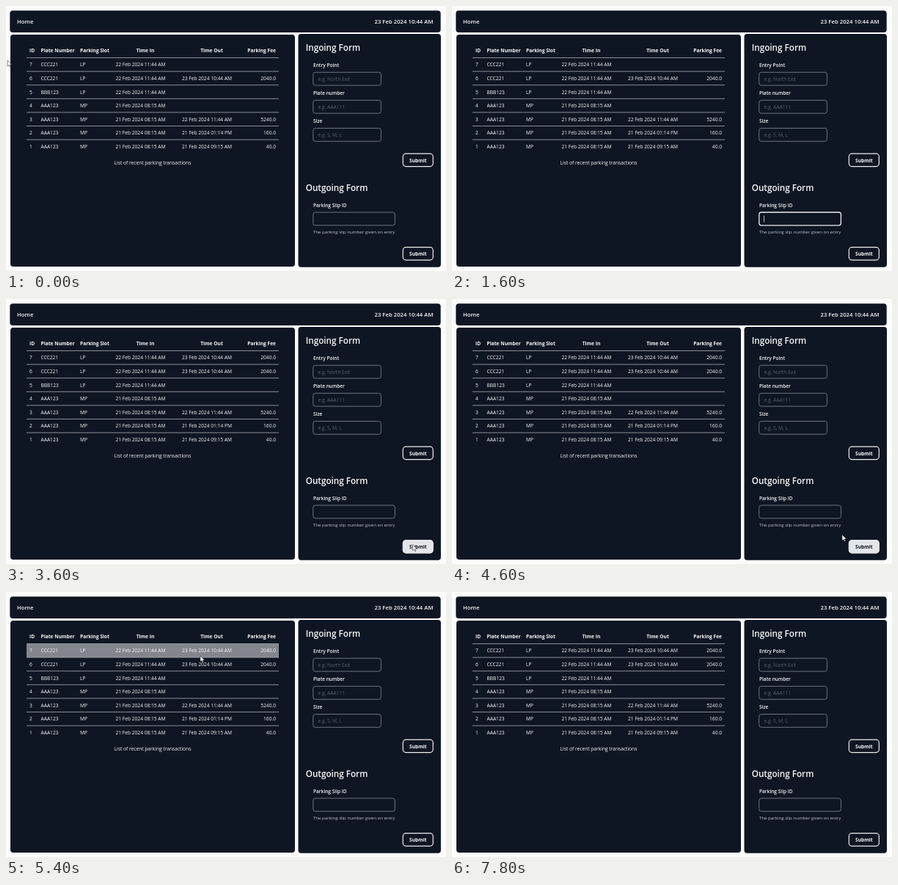
Write an HTML page that moves like this. It is 600 by 361 pixels and loops after 7.9 s.

```html
<!DOCTYPE html>
<html lang="en">
<head>
<meta charset="utf-8">
<title>Parking dashboard</title>
<style>
html, body { margin: 0; width: 100%; height: 100%; overflow: hidden; background: #fcfcfd; }
svg { display: block; width: 600px; height: 361px; }
text { font-family: "Open Sans", "Noto Sans", sans-serif; font-size: 6.65px; fill: #f6f7f9; white-space: pre; }
.panel { fill: #0f1623; }
.bold { font-weight: 700; }
.semi { font-weight: 600; }
.nav { font-weight: 600; font-size: 7.75px; }
.title { font-weight: 600; font-size: 11.7px; }
.label { font-weight: 600; font-size: 6.55px; }
.dim { fill: #59606d; }
.hint { font-size: 6.1px; fill: #c3c7ce; }
.field { fill: none; stroke: #858b96; stroke-width: .8; }
.field.focus { stroke: #eceef1; stroke-width: 1.3; }
.button { fill: none; stroke: #eceef1; stroke-width: 1.2; }
.button.hover { fill: #e3e5e9; stroke: #e3e5e9; }
.button.hover + text { fill: #0f1623; }
.rule { stroke: #a9adb4; stroke-width: .8; }
.row { fill: #83868e; }
</style>
</head>
<body>
<svg id="stage" viewBox="0 0 600 361"></svg>
<script>
const LOOP = 7900, STEP = 100, PAID = 3600;
const ROW_TOP = 70.5, ROW_H = 18.6;
const stage = document.getElementById('stage');
const parts = [];

const text = (x, y, s, cls = '', anchor = 'start', id = '') =>
  parts.push(`<text x="${x}" y="${y}" class="${cls}" text-anchor="${anchor}" id="${id}">${s}</text>`);
const rect = (x, y, w, h, cls, r = 0, id = '') =>
  parts.push(`<rect x="${x}" y="${y}" width="${w}" height="${h}" rx="${r}" class="${cls}" id="${id}"/>`);

const columns = [[32, 'start'], [47.5, 'start'], [101, 'start'], [183.5, 'middle'], [274, 'middle'], [368, 'end']];
const rows = [
  ['7', 'CCC221', 'LP', '22 Feb 2024 11:44 AM', '23 Feb 2024 10:44 AM', '2040.0'],
  ['6', 'CCC221', 'LP', '22 Feb 2024 11:44 AM', '23 Feb 2024 10:44 AM', '2040.0'],
  ['5', 'BBB123', 'LP', '22 Feb 2024 11:44 AM', '', ''],
  ['4', 'AAA123', 'MP', '21 Feb 2024 08:15 AM', '', ''],
  ['3', 'AAA123', 'MP', '21 Feb 2024 08:15 AM', '22 Feb 2024 11:44 AM', '5240.0'],
  ['2', 'AAA123', 'MP', '21 Feb 2024 08:15 AM', '21 Feb 2024 01:14 PM', '160.0'],
  ['1', 'AAA123', 'MP', '21 Feb 2024 08:15 AM', '21 Feb 2024 09:15 AM', '40.0']
];

function buildTable() {
  rect(6, 39, 388, 316, 'panel', 4);
  rect(28, ROW_TOP, 344, ROW_H, 'row', 0, 'rowHover');
  ['ID', 'Plate Number', 'Parking Slot', 'Time In', 'Time Out', 'Parking Fee'].forEach((s, i) => {
    const [x, anchor] = columns[i];
    text(anchor === 'middle' ? x + 6.5 : x, 63.3, s, 'bold', anchor);
  });
  rows.forEach((cells, r) => {
    const y = ROW_TOP + r * ROW_H;
    parts.push(`<path d="M28 ${y}H372" class="rule"/>`);
    cells.forEach((s, c) =>
      text(columns[c][0], y + 11.9, s, '', columns[c][1], r === 0 && c > 3 ? 'paid' + c : ''));
  });
  text(200, 215.7, 'List of recent parking transactions', '', 'middle');
}

function submit(y, id) {
  rect(541.3, y, 41, 17.4, 'button', 4, id);
  text(561.8, y + 11.3, 'Submit', 'bold', 'middle');
}

function buildForms() {
  rect(398.5, 38, 194.5, 317.7, 'panel', 4);
  text(408.7, 61.2, 'Ingoing Form', 'title');
  [['Entry Point', 'e.g. North Exit'], ['Plate number', 'e.g. AAA111'], ['Size', 'e.g. S, M, L']].forEach(([label, tip], i) => {
    const y = 90.3 + i * 38.1;
    text(419, y - 7.1, label, 'label');
    rect(418.8, y, 92.6, 17.8, 'field', 3);
    text(425.5, y + 11.2, tip, 'dim');
  });
  submit(201.2, 'submitIn');
  text(408.7, 251.9, 'Outgoing Form', 'title');
  text(419, 274, 'Parking Slip ID', 'label');
  rect(418.8, 281, 111.6, 17.8, 'field', 3, 'slip');
  text(425.7, 292.4, '7', '', 'start', 'typed');
  rect(425.3, 285.5, .7, 9, '', 0, 'caret');
  text(419, 310.4, 'The parking slip number given on entry', 'hint');
  submit(328.7, 'submitOut');
}

rect(5.3, 6.3, 587.4, 29.6, 'panel', 4);
text(15, 23.8, 'Home', 'nav');
text(582.6, 23.8, '23 Feb 2024 10:44 AM', 'nav', 'end');
buildTable();
buildForms();
parts.push('<path id="cursor" d="M0 0V8.2L1.9 6.4 3.2 9.3 4.5 8.7 3.2 5.9H5.8Z" fill="#fff" stroke="#111" stroke-width=".5"/>');
stage.innerHTML = parts.join('');

const $ = id => document.getElementById(id);
const show = (id, on) => $(id).setAttribute('visibility', on ? 'visible' : 'hidden');

// Pointer path: time, x, y
const path = [
  [0, 2, 74], [500, 62, 80], [900, 62, 80], [1000, 94, 104], [1200, 290, 200],
  [1400, 440, 270], [1600, 478, 290], [2800, 478, 290], [2900, 541, 317],
  [3000, 550, 330], [3100, 554.5, 334.5], [3900, 554.5, 334.5], [4100, 557.5, 338.5],
  [4500, 557.5, 338.5], [4600, 532, 321], [4900, 370, 200], [5200, 275, 103],
  [5300, 267, 88.5], [5400, 265, 87], [5700, 270, 80], [5800, 270, 80],
  [6300, 358, 80], [6900, 358, 80], [7000, 352, 80], [7600, 200, 372], [LOOP, 200, 372]
];

function pointer(t) {
  t = (t + LOOP) % LOOP;
  const i = path.findIndex(p => p[0] > t);
  const [t0, x0, y0] = path[i - 1], [t1, x1, y1] = path[i];
  const k = (t - t0) / (t1 - t0);
  return [x0 + (x1 - x0) * k, y0 + (y1 - y0) * k];
}

const inside = (x, y, l, t, r, b) => x >= l && x <= r && y >= t && y <= b;

// The arrow gives way to a text pointer over the slip field and the first row's cells.
const overText = (x, y) => inside(x, y, 419, 281, 530, 299) ||
  [[47, 73], [149, 219], [239, 309], [346, 369]].some(([l, r]) => inside(x, y, l, 75, r, 85));

function draw(now) {
  const t = Math.floor(now % LOOP / STEP) * STEP;
  const [x, y] = pointer(t);
  $('cursor').setAttribute('transform', `translate(${x} ${y})`);
  show('cursor', !overText(x, y));

  // Hover styles trail the pointer by one step.
  const [hx, hy] = pointer(t - STEP);
  const row = Math.floor((hy - ROW_TOP) / ROW_H);
  show('rowHover', hx >= 28 && hx <= 372 && row >= 0 && row < rows.length);
  $('rowHover').setAttribute('y', ROW_TOP + row * ROW_H);
  $('submitOut').classList.toggle('hover', inside(hx, hy, 541, 328, 583, 347));

  const typed = t >= 2600 && t < PAID;
  show('typed', typed);
  show('caret', typed || t >= 1600 && t < 2200);
  $('caret').setAttribute('x', typed ? 429.3 : 425.3);
  $('caret').setAttribute('fill', '#f6f7f9');
  $('slip').classList.toggle('focus', t >= 1600 && t < PAID);
  show('paid4', t >= PAID);
  show('paid5', t >= PAID);
}

const start = performance.now();
function frame() {
  draw(performance.now() - start);
  requestAnimationFrame(frame);
}
frame();
</script>
</body>
</html>
```
